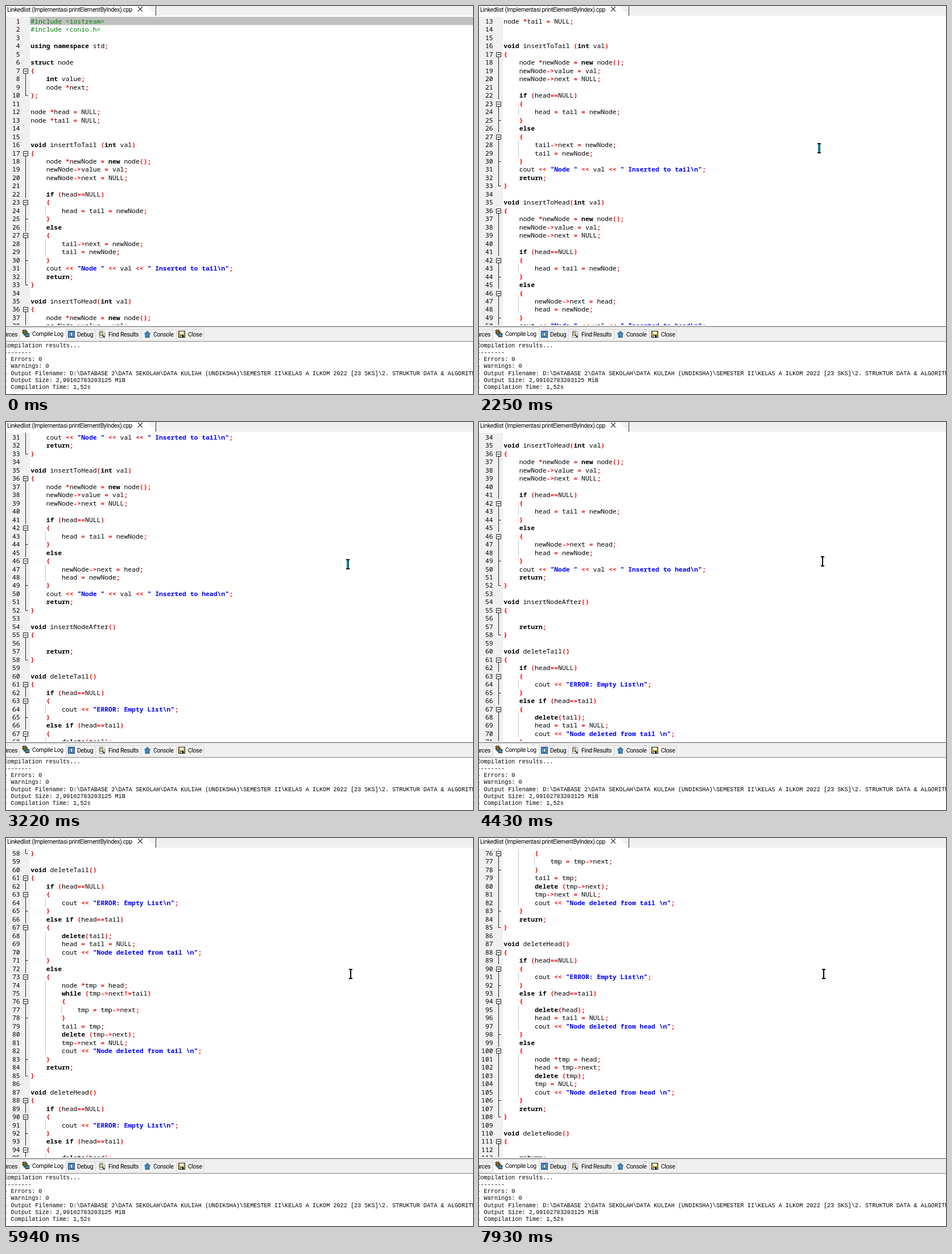
An HTML page that plays this animation: 821 by 682 pixels, repeating every 8000 ms.

```html
<!DOCTYPE html>
<html lang="id">
<head>
<meta charset="utf-8">
<title>Linked list code walkthrough</title>
<style>
html, body { margin: 0; width: 100%; height: 100%; overflow: hidden; background: #fff; }
svg { display: block; width: 100vw; height: 100vh; }
text { white-space: pre; }
.code { font: 11.4px "Noto Sans Mono", "DejaVu Sans Mono", monospace; }
.ui { font: 10.4px Roboto, "Open Sans", sans-serif; letter-spacing: -0.3px; fill: #000; }
.log { font: 10.16px "Liberation Mono", monospace; fill: #000; }
.key { font-weight: 700; }
.sym { font-weight: 700; fill: #f00; }
.str { font-weight: 700; fill: #00f; }
.pre { fill: #008000; }
</style>
</head>
<body>
<svg id="stage" viewBox="0 0 821 682" preserveAspectRatio="none">
  <defs><clipPath id="view"><rect y="19" width="821" height="542"/></clipPath></defs>
  <rect width="821" height="682" fill="#fff"/>
  <g clip-path="url(#view)">
    <rect y="19" width="42" height="542" fill="#f0f0f0"/>
    <g id="rows"></g>
  </g>

  <g id="fileTab">
    <path d="M248 0H821V17H263Z" fill="#f0f0f0"/>
    <path d="M263.5 0V17" stroke="#333"/>
    <path d="M232 1.5l8 8m0-8l-8 8" stroke="#333" stroke-width="1.1"/>
    <text class="ui" x="2" y="9.5">Linkedlist (Implementasi printElementByIndex).cpp</text>
  </g>

  <g id="panel">
    <rect y="562" width="821" height="28" fill="#f0f0f0"/>
    <path d="M0 563.5H821" stroke="#666"/>
    <rect x="24" y="565" width="81" height="24" fill="#fff"/>
    <path d="M24.5 588V565.5H105.5V588M105 568.5H347.5V586M157.5 568V586M237.5 568V586M299.5 568V586M0 568.5H24" fill="none" stroke="#d6d6d6"/>
    <path d="M0 589.5H821" stroke="#828282"/>
    <g transform="translate(29 569)" stroke="#222">
      <rect x=".5" y=".5" width="6" height="6" fill="#d9702c"/>
      <rect x="2.5" y="3.5" width="6" height="6" fill="#4f9a4a"/>
      <rect x="5.5" y="6.5" width="6" height="6" fill="#4a86c5"/>
    </g>
    <g transform="translate(109 571)">
      <rect x=".5" y=".5" width="11" height="11" fill="#5b9bd8" stroke="#123a6b"/>
      <rect x="4" y="2.5" width="4" height="7" fill="#dcebf8" stroke="#123a6b"/>
    </g>
    <g transform="translate(163 571)">
      <path d="M1.5 .5h6l3 3v8h-9z" fill="#fff" stroke="#777"/>
      <circle cx="4.5" cy="5" r="3" fill="#f3d98a" stroke="#333"/>
      <path d="M6.5 7.5l4 4" stroke="#333" stroke-width="2"/>
    </g>
    <path d="M248.5 571.5l5 4.5h-1.5v6.5h-7V576h-1.5z" fill="#3b8cc4" stroke="#1c5480"/>
    <g transform="translate(303 571)">
      <rect x=".5" y=".5" width="11" height="11" fill="#d8bd3c" stroke="#222"/>
      <rect x="3" y="1" width="6" height="4.5" fill="#fff"/>
      <rect x="3" y="7" width="6.5" height="4.5" fill="#222"/>
      <rect x="4" y="8" width="2" height="3" fill="#fff"/>
    </g>
  </g>
  <g id="log"></g>

  <g id="cursor">
    <path d="M-3-9h6v2H1V7h2v2h-6V7h2V-7h-2z" fill="#000"/>
    <g id="glow">
      <rect x="-2" y="-8" width="4" height="16" fill="#10303c"/>
      <rect x="-1.5" y="-7" width="2.5" height="14" fill="#1c93b8"/>
    </g>
  </g>
</svg>

<script>
const LOOP = 8000, ROW = 14.47, TOP = 19, CHAR = 6.84, LEFT = 43.3;
const byId = id => document.getElementById(id);

function add(parent, tag, attrs, content) {
  const el = document.createElementNS("http://www.w3.org/2000/svg", tag);
  for (const name in attrs) el.setAttribute(name, attrs[name]);
  if (content !== undefined) el.textContent = content;
  parent.appendChild(el);
  return el;
}

const code = String.raw`#include <iostream>
#include <conio.h>

using namespace std;

struct node
{
    int value;
    node *next;
};

node *head = NULL;
node *tail = NULL;


void insertToTail (int val)
{
    node *newNode = new node();
    newNode->value = val;
    newNode->next = NULL;

    if (head==NULL)
    {
        head = tail = newNode;
    }
    else
    {
        tail->next = newNode;
        tail = newNode;
    }
    cout << "Node " << val << " Inserted to tail\n";
    return;
}

void insertToHead(int val)
{
    node *newNode = new node();
    newNode->value = val;
    newNode->next = NULL;

    if (head==NULL)
    {
        head = tail = newNode;
    }
    else
    {
        newNode->next = head;
        head = newNode;
    }
    cout << "Node " << val << " Inserted to head\n";
    return;
}

void insertNodeAfter()
{

    return;
}

void deleteTail()
{
    if (head==NULL)
    {
        cout << "ERROR: Empty List\n";
    }
    else if (head==tail)
    {
        delete(tail);
        head = tail = NULL;
        cout << "Node deleted from tail \n";
    }
    else
    {
        node *tmp = head;
        while (tmp->next!=tail)
        {
            tmp = tmp->next;
        }
        tail = tmp;
        delete (tmp->next);
        tmp->next = NULL;
        cout << "Node deleted from tail \n";
    }
    return;
}

void deleteHead()
{
    if (head==NULL)
    {
        cout << "ERROR: Empty List\n";
    }
    else if (head==tail)
    {
        delete(head);
        head = tail = NULL;
        cout << "Node deleted from head \n";
    }
    else
    {
        node *tmp = head;
        head = tmp->next;
        delete (tmp);
        tmp = NULL;
        cout << "Node deleted from head \n";
    }
    return;
}

void deleteNode()
{

    return;`.split("\n");

const keywords = new Set("using namespace struct int void new if else return while delete".split(" "));

function tokens(line) {
  if (line[0] === "#") return [{ text: line, col: 0, kind: "pre" }];
  return [...line.matchAll(/"(?:[^"\\]|\\.)*"|\w+|[^\w\s"]+/g)].map(m => {
    const text = m[0];
    const kind = text[0] === '"' ? "str" : keywords.has(text) ? "key" : /\w/.test(text) ? "id" : "sym";
    return { text, col: m.index, kind };
  });
}

// Every row is drawn from y = 0 and placed on screen by render().
function drawCode() {
  const open = [];
  return code.map((line, i) => {
    const row = add(byId("rows"), "g", {});
    const brace = line.trim()[0];
    let fold = "";

    if (i === 0) add(row, "rect", { x: 42, width: 779, height: 14.5, fill: "#c0c0c0" });
    if (brace === "}") open.pop();
    for (const col of open) {
      if (!col) continue;
      const x = Math.round(LEFT + col * CHAR - 1.5) + 0.5;
      add(row, "path", { d: `M${x} 0V15`, stroke: "#c4c4c4" });
    }
    if (brace === "{") {
      fold = "M30.5 4.5h8v8h-8zM32 8.5h5M34.5 12.5V15";
      open.push(line.indexOf("{"));
    } else if (brace === "}") {
      fold = `M34.5 0V${open.length ? 15 : 8.5}M34.5 8.5h4`;
    } else if (open.length) {
      fold = "M34.5 0V15";
    }
    if (fold) add(row, "path", { d: fold, fill: "none", stroke: "#222" });

    add(row, "text", { class: "code", x: 24.6, y: 12, "text-anchor": "end" }, i + 1);
    const text = add(row, "text", { class: "code", y: 12 });
    for (const t of tokens(line)) {
      add(text, "tspan", { x: LEFT + t.col * CHAR, class: t.kind }, t.text);
    }
    return row;
  });
}

function drawPanel() {
  const label = (x, y, text, anchor = "start") =>
    add(byId("panel"), "text", { class: "ui", x, y, "text-anchor": anchor }, text);
  label(20, 580.5, "Resources", "end");
  label(46, 579.5, "Compile Log");
  label(125, 580.5, "Debug");
  label(180, 580.5, "Find Results");
  label(259, 580.5, "Console");
  label(320, 580.5, "Close");

  String.raw`Compilation results...
--------
- Errors: 0
- Warnings: 0
- Output Filename: D:\DATABASE 2\DATA SEKOLAH\DATA KULIAH (UNDIKSHA)\SEMESTER II\KELAS A ILKOM 2022 [23 SKS]\2. STRUKTUR DATA & ALGORITMA
- Output Size: 2,99102783203125 MiB
- Compilation Time: 1,52s`.split("\n").forEach((line, i) =>
    add(byId("log"), "text", { class: "log", x: -3.6, y: Math.round(600 + i * 12.15) }, line));
}

// Each wheel notch moves the view three lines.
const notches = [
  1980, 2060, 2140, 2220, 2300, 2380, 2460,
  2800, 2980, 3160, 3340,
  4600, 4740, 4880, 5020,
  5460, 5600, 5740, 5880,
  7650, 7650, 7720, 7790, 7860, 7930
];

// Pointer path: time, x, y
const path = [
  [260, 784, 540], [480, 690, 410], [720, 560, 300], [860, 531, 267], [1020, 547, 266],
  [1300, 584, 257], [1510, 595, 252], [1850, 598, 250], [2600, 598, 250], [2800, 600, 250],
  [3490, 601.5, 250], [4360, 601.5, 250], [4430, 604, 245], [5180, 606, 239], [LOOP, 606, 239]
];

function pointAt(t) {
  const i = Math.max(1, path.findIndex(p => p[0] > t));
  const [t0, x0, y0] = path[i - 1], [t1, x1, y1] = path[i];
  const k = (t - t0) / (t1 - t0);
  return [Math.round(x0 + (x1 - x0) * k), Math.round(y0 + (y1 - y0) * k)];
}

let shown = -1;
function scrollTo(first) {
  if (first === shown) return;
  shown = first;
  rows.forEach((row, i) =>
    row.setAttribute("transform", `translate(0 ${Math.round(TOP + (i - first) * ROW)})`));
}

function render(t) {
  scrollTo(3 * notches.filter(n => n <= t).length);

  const cursor = byId("cursor");
  cursor.setAttribute("visibility", t < 260 ? "hidden" : "visible");
  if (t >= 260) cursor.setAttribute("transform", `translate(${pointAt(t).join(" ")})`);

  const beat = Math.floor(t / 70) % 10;
  byId("glow").setAttribute("opacity", beat >= 3 && beat <= 5 ? 0 : 1);
}

const rows = drawCode();
drawPanel();
const start = performance.now();
function tick() {
  render((performance.now() - start) % LOOP);
  requestAnimationFrame(tick);
}
render(0);
requestAnimationFrame(tick);
</script>
</body>
</html>
```
